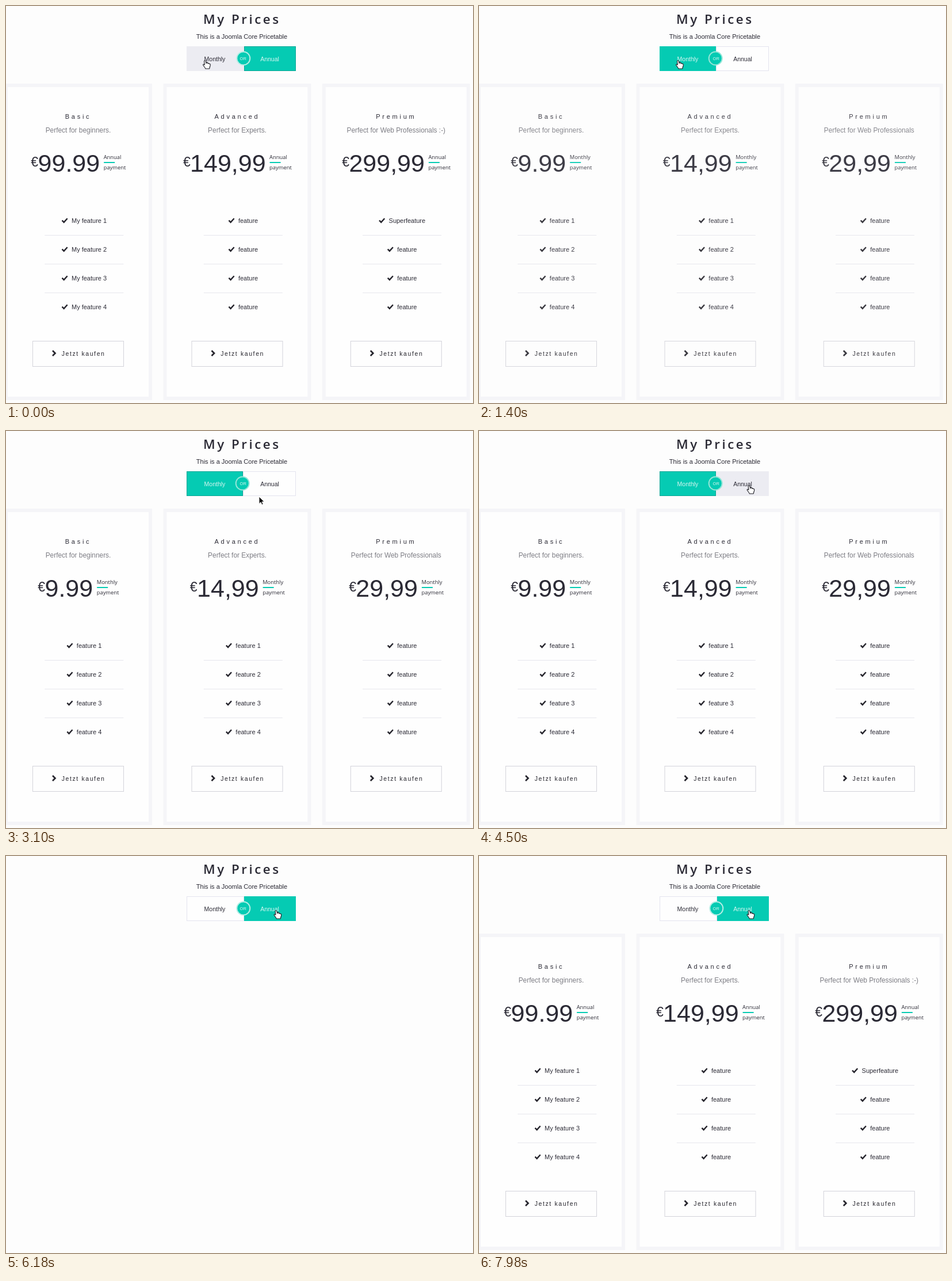
These frames come from a looping animation (812x690 px, 8000 ms). An HTML page:

```html
<!DOCTYPE html>
<html lang="en">
<head>
<meta charset="utf-8">
<title>Price table</title>
<style>
  html, body { margin: 0; width: 100%; height: 100%; overflow: hidden; background: #fdfdfd; }
  svg { display: block; width: 812px; height: 690px; }
  text { font: 11px "Liberation Sans", Arial, sans-serif; fill: #2b2a35; }
  .mid { text-anchor: middle; }
  .title { font: 600 22.4px "Open Sans", sans-serif; letter-spacing: 3.5px; }
  .tab { font-size: 10.5px; }
  .or { font-size: 7.5px; fill: #d8f6f1; }
  .name { letter-spacing: 3.75px; }
  .tagline { font-size: 11.9px; fill: #7d7d84; }
  .euro { font-size: 23px; }
  .price { font-size: 43px; }
  .period { font: 9.4px "Open Sans", sans-serif; }
  .buy { font-size: 10.5px; letter-spacing: 1.6px; }
  .icon { fill: none; stroke: #26252d; stroke-width: 2.4; }
</style>
</head>
<body>
<svg viewBox="0 0 812 690" id="stage"></svg>
<script>
const DURATION = 8000;
const TEAL = '#05cbb3';
const CENTERS = [125.5, 402, 678.3];
const NUMBERED = [1, 2, 3, 4].map(n => `feature ${n}`);
const PLAIN = Array(4).fill('feature');

const PLANS = {
  Annual: [
    ['Basic', 'Perfect for beginners.', '99.99', NUMBERED.map(f => 'My ' + f)],
    ['Advanced', 'Perfect for Experts.', '149,99', PLAIN],
    ['Premium', 'Perfect for Web Professionals :-)', '299,99', ['Superfeature', ...PLAIN.slice(1)]]
  ],
  Monthly: [
    ['Basic', 'Perfect for beginners.', '9.99', NUMBERED],
    ['Advanced', 'Perfect for Experts.', '14,99', NUMBERED],
    ['Premium', 'Perfect for Web Professionals', '29,99', PLAIN]
  ]
};

const text = (x, y, cls, str) => `<text x="${x}" y="${y}" class="${cls}">${str}</text>`;
const rect = (x, y, w, h, attrs) => `<rect x="${x}" y="${y}" width="${w}" height="${h}" ${attrs}/>`;

// Advance width in Arial metrics
const CHAR_WIDTHS = { M: .833, S: .667, y: .5, f: .278, t: .278, r: .333, ' ': .278, '.': .278, ',': .278 };
const widthOf = (str, size) => size * [...str].reduce((sum, c) => sum + (CHAR_WIDTHS[c] || .556), 0);

function priceRow(cx, amount, period) {
  const w = widthOf(amount, 43);
  const x = cx - (w + 56.7) / 2;
  const label = x + w + 18.7;
  return text(x, 279, 'euro', '€') + text(x + 12.2, 288, 'price', amount) +
    text(label, 266, 'period', period) + text(label, 284, 'period', 'payment') +
    rect(label + .5, 271, 19, 2, `fill="${TEAL}"`);
}

function featureRow(cx, label, i) {
  const y = 377 + i * 50;
  const x = cx - (widthOf(label, 11) + 17.5) / 2;
  const line = i < 3 ? rect(cx - 68.5, y + 21, 137, 1, 'fill="#e6e6ed"') : '';
  return `<path class="icon" d="M${x + 1} ${y - 4.3}l3.2 3.2 6-6.6"/>` +
    text(x + 17.5, y, '', label) + line;
}

function button(cx, hovered) {
  const x = cx - 79.5;
  const look = hovered ? `fill="${TEAL}" stroke="${TEAL}"` : 'fill="#fefefe" stroke="#d3d3da"';
  const ink = hovered ? '#e2f9f5' : '#26252d';
  return rect(x + .5, 582.5, 158, 44, look) +
    `<path class="icon" style="stroke:${ink};stroke-width:2.7" d="M${x + 35} 599l4.5 4.5-4.5 4.5"/>` +
    `<text x="${x + 50.7}" y="608" class="buy" style="fill:${ink}">Jetzt kaufen</text>`;
}

function card([name, tagline, amount, features], i, period) {
  const cx = CENTERS[i];
  const left = cx - 122.5;
  const hover = period === 'Monthly' && i === 1;
  return rect(left - 3, 138, 251, 544, 'fill="#fefefe" stroke="#f5f5f8" stroke-width="6"') +
    (hover ? `<g class="hover">${
      rect(left - 3, 138, 251, 544, 'fill="none" stroke="#fcfcfd" stroke-width="6"')}${
      rect(left + .5, 141.5, 244, 537, 'fill="#fefefe" stroke="#f0f0f5"')}${
      rect(left, 141, 245, 185, 'fill="#f1f3f7"')}</g>` : '') +
    text(cx, 196, 'mid name', name) + text(cx, 220, 'mid tagline', tagline) +
    priceRow(cx, amount, period) +
    features.map((f, n) => featureRow(cx + 10.3, f, n)).join('') +
    button(cx) + (hover ? `<g class="hover">${button(cx, true)}</g>` : '');
}

const table = period =>
  `<g id="table${period}">${PLANS[period].map((p, i) => card(p, i, period)).join('')}</g>`;
const tab = (name, x) =>
  `<rect id="box${name}" y="70.5" height="42"/><text id="label${name}" x="${x}" y="96" class="mid tab">${name}</text>`;

const $ = id => document.getElementById(id);

$('stage').innerHTML = rect(0, 0, 812, 690, 'fill="#fdfdfd"') +
  text(343, 31, 'title', 'My Prices') +
  text(410, 57, 'mid', 'This is a Joomla Core Pricetable') +
  tab('Monthly', 363) + tab('Annual', 458.5) +
  `<circle id="knob" cy="91" r="11.5" fill="${TEAL}" stroke="#95e6d8" stroke-width="2"/>` +
  text(412.2, 94, 'mid or', 'OR') +
  table('Annual') + table('Monthly') +
  `<g id="cursor" stroke-linejoin="round">
    <path id="arrow" d="M0 0V12.5L3 9.8 5 14.3 7.2 13.3 5.3 9H9.2Z" fill="#111" stroke="#fff" stroke-width=".9"/>
    <path id="hand" d="M-1.4 1.2C-1.4-.6 1-.6 1.3 1L2.2 5C3-.0 5 4 5 5.2 5.6 4 7.2 4.4 7.4 5.8 8.3 5 9.4 5.8 9.3 7.2 9.2 9.6 8.2 10.6 7.7 14H.8C.2 11.6-2 10-3.2 7.8-3.7 6.3-2 5.6-.6 7.4Z" fill="#fff" stroke="#1b1b22" stroke-width="1.1"/>
  </g>`;

// time, x, y of the pointer tip
const PATH = [
  [0, 346, 95], [1700, 346, 95], [2100, 346, 175], [2420, 346, 175],
  [3000, 440, 114], [3350, 440, 114], [3850, 469.5, 95], [DURATION, 469.5, 95]
];
const CLICKS = [500, 5620];
const FADE = 500;

const clamp = v => Math.max(0, Math.min(1, v));
const swing = p => .5 - Math.cos(Math.PI * clamp(p)) / 2;
const ramp = (t, start, length) => swing((t - start) / length);

function pointerAt(t) {
  const i = Math.max(1, PATH.findIndex(p => p[0] > t));
  const [t0, x0, y0] = PATH[i - 1], [t1, x1, y1] = PATH[i];
  const k = swing((t - t0) / (t1 - t0));
  return [x0 + (x1 - x0) * k, y0 + (y1 - y0) * k];
}

function paintTab(name, x, right, active, hovered) {
  const box = $('box' + name);
  box.setAttribute('x', x + .5);
  box.setAttribute('width', right - x - 1);
  box.setAttribute('fill', active ? TEAL : hovered ? '#ececf2' : '#fefefe');
  box.setAttribute('stroke', active ? (hovered ? TEAL : '#0aa595') : hovered ? '#ececf2' : '#e4e4ef');
  $('label' + name).style.fill = active ? '#d8f6f1' : '#2b2a35';
}

function render(t) {
  const [x, y] = pointerAt(t);
  const monthly = t >= CLICKS[0] && t < CLICKS[1];
  const split = monthly ? 412 : 414;
  const overTabs = y < 113;

  paintTab('Monthly', 314, split, monthly, overTabs && x < split);
  paintTab('Annual', split, 504, !monthly, overTabs && x >= split);
  $('knob').setAttribute('cx', monthly ? 411.2 : 412.8);
  $('knob').setAttribute('stroke', monthly ? '#95e6d8' : '#b5eee5');

  const [toMonthly, toAnnual] = CLICKS;
  $('tableMonthly').style.opacity = ramp(t, toMonthly + FADE, FADE) - ramp(t, toAnnual, FADE);
  $('tableAnnual').style.opacity =
    1 - ramp(t, toMonthly, FADE) + ramp(t, toAnnual + FADE + 60, FADE);

  const hover = ramp(t, 1920, 220) - ramp(t, 2680, 220);
  document.querySelectorAll('.hover').forEach(el => el.style.opacity = hover);

  $('cursor').setAttribute('transform', `translate(${x} ${y})`);
  $('hand').style.display = overTabs ? '' : 'none';
  $('arrow').style.display = overTabs ? 'none' : '';
}

const start = performance.now();
function tick(now) {
  render(Math.max(0, now - start) % DURATION);
  requestAnimationFrame(tick);
}
render(0);
requestAnimationFrame(tick);
</script>
</body>
</html>
```
